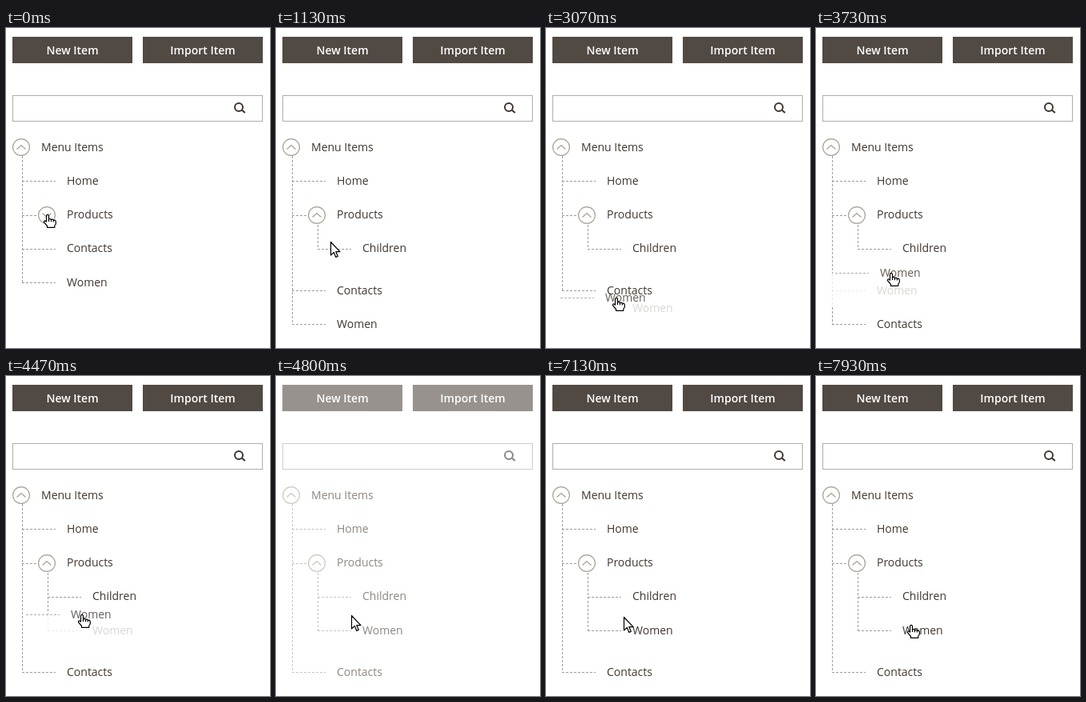
An HTML page with a canvas that plays this animation: 330x400 px, repeating every 8 s.

```html
<!DOCTYPE html>
<html lang="en">
<head>
<meta charset="utf-8">
<title>Menu tree</title>
<style>
  html, body { margin: 0; width: 100%; height: 100%; overflow: hidden; background: #fff; }
  canvas { display: block; }
</style>
</head>
<body>
<canvas id="stage" width="330" height="400"></canvas>
<script>
const ctx = document.getElementById('stage').getContext('2d');
const LOOP = 8000, EXPAND = 530, GRAB = 2470, DROP = 4530, READY = 6600;
const INK = '#41362f', BROWN = '#514943', RING = '#aaa093', DASH = '#9c9c9c';
const FONT = '"Open Sans", "Noto Sans", sans-serif';

// Pointer tip: time, x, y
const route = [
  [0, 52, 233], [800, 52, 233], [1350, 78, 290], [1930, 89, 374], [GRAB, 89, 374],
  [3070, 88, 337], [3330, 91, 322], [3730, 94, 306], [4470, 95, 298],
  [DROP, 94, 299], [7000, 94, 299], [7930, 119, 311]
];

const hand = new Path2D('M-1.5 1.5Q0-.7 1.5 1.5V6Q3.5 4.8 4.5 6.6Q6.3 5.6 7.3 7.3Q9.8 6.6 10.3 9' +
  'V12L8.8 14V16.3H-.5V14.5L-4.6 9.6Q-4.4 7-2.6 8.2L-1.5 9.2ZM1.5 6V9M4.5 6.6V9.3M7.3 7.3V9.5');
const arrow = new Path2D('M.5.5V17L4.3 13.4L6.8 19.4L9.3 18.4L6.8 12.6H12Z');

function pointerAt(t) {
  let i = 1;
  while (i < route.length - 1 && route[i][0] < t) i++;
  const [t0, x0, y0] = route[i - 1], [t1, x1, y1] = route[i];
  const k = Math.min(1, (t - t0) / (t1 - t0));
  return [Math.round(x0 + (x1 - x0) * k), Math.round(y0 + (y1 - y0) * k)];
}

function stroke(color, width, points) {
  ctx.strokeStyle = color;
  ctx.lineWidth = width;
  ctx.beginPath();
  for (const [x, y] of points) ctx.lineTo(x, y);
  ctx.stroke();
}

function dashed(x0, y0, x1, y1) {
  ctx.setLineDash([3, 2]);
  const d = y0 === y1 ? [0, .5] : [.5, 0];
  stroke(DASH, 1, [[x0 + d[0], y0 + d[1]], [x1 + d[0], y1 + d[1]]]);
  ctx.setLineDash([]);
}

function text(str, x, y, color = INK, weight = 400, align = 'left') {
  ctx.font = `${weight} 14px ${FONT}`;
  ctx.textAlign = align;
  ctx.fillStyle = color;
  ctx.fillText(str, x, y + 5);
}

function faded(alpha, draw) {
  ctx.save();
  ctx.globalAlpha = alpha;
  draw();
  ctx.restore();
}

// A label with the dashed hook on its left
function leaf(str, x, y, rule = y) {
  dashed(x - 56, rule, x - 14, rule);
  text(str, x, y);
}

function toggle(x, y, open) {
  const s = open ? 1 : -1;
  ctx.beginPath();
  ctx.arc(x, y, 10.4, 0, 7);
  ctx.fillStyle = '#fff';
  ctx.fill();
  ctx.strokeStyle = RING;
  ctx.lineWidth = 1.2;
  ctx.stroke();
  stroke(RING, 1.2, [[x - 5.5, y + 2.5 * s], [x, y - 2.5 * s], [x + 5.5, y + 2.5 * s]]);
}

function button(str, x) {
  ctx.fillStyle = BROWN;
  ctx.fillRect(x, 11, 150, 33);
  text(str, x + 75, 28, '#fff', 600, 'center');
}

function toolbar() {
  button('New Item', 8);
  button('Import Item', 171);
  ctx.strokeStyle = '#adadad';
  ctx.lineWidth = 1;
  ctx.strokeRect(8.5, 84.5, 312, 32);
  ctx.strokeStyle = INK;
  ctx.lineWidth = 2;
  ctx.beginPath();
  ctx.arc(291, 99, 5, 0, 7);
  ctx.stroke();
  stroke(INK, 2.2, [[294.8, 102.5], [298.8, 106]]);
}

function slotAt(t) {
  if (t < GRAB) return 'none';
  if (t < 2800) return 'last';
  if (t < 3370) return 'inContacts';
  if (t < 4000) return 'between';
  return t < DROP ? 'inProducts' : 'dropped';
}

function tree(t, slot) {
  const u = Math.max(0, Math.min(1, (t - EXPAND) / 200));
  const shift = Math.round(53 * (.5 - Math.cos(Math.PI * u) / 2));
  const moved = slot === 'between' || slot === 'inProducts' || slot === 'dropped';
  const contacts = moved ? 370 : 275 + shift;
  const women = shift === 53 ? 370 : 318 + shift;

  if (slot === 'between') {
    dashed(20, 160, 20, 307);
    faded(.2, () => dashed(20, 307, 20, 349));
    dashed(20, 349, 20, 370);
  } else {
    dashed(20, 160, 20, slot === 'none' ? women : contacts);
  }
  leaf('Home', 76, 191);
  dashed(20, 234, 40, 234);
  text('Products', 76, 233);

  if (shift) {
    ctx.save();
    ctx.beginPath();
    ctx.rect(0, 244, 330, moved ? 156 : shift);
    ctx.clip();
    dashed(52, 246, 52, slot === 'dropped' ? 318 : slot === 'inProducts' ? 297 : 276);
    leaf('Children', 108, 275, 276);
    ctx.restore();
  }
  toggle(51, 234, t >= EXPAND);
  leaf('Contacts', 76, contacts, contacts === 275 ? 276 : contacts);

  if (slot === 'none') leaf('Women', 76, women);
  if (slot === 'dropped') leaf('Women', 108, 318);
  faded(.2, () => {
    if (slot === 'last') {
      dashed(20, 328, 20, 370);
      leaf('Women', 76, 370);
    }
    if (slot === 'inContacts') text('Women', 108, 350);
    if (slot === 'between') leaf('Women', 76, 328);
    if (slot === 'inProducts') {
      dashed(52, 297, 52, 318);
      leaf('Women', 108, 318);
    }
  });

  toggle(19, 149, true);
  text('Menu Items', 44, 149);
}

function pointer(t, x, y) {
  const plain = (t > 1000 && t < 1800) || (t >= DROP && t < 7450);
  const shape = plain ? arrow : hand;
  ctx.save();
  ctx.translate(x, y);
  ctx.lineJoin = 'round';
  ctx.fillStyle = '#fff';
  ctx.fill(shape);
  ctx.strokeStyle = '#000';
  ctx.lineWidth = 1.2;
  ctx.stroke(shape);
  ctx.restore();
}

function draw(now) {
  const t = now % LOOP;
  const [x, y] = pointerAt(t);
  ctx.fillStyle = '#fff';
  ctx.fillRect(0, 0, 330, 400);
  toolbar();
  tree(t, slotAt(t));
  if (t >= GRAB && t < DROP) faded(.8, () => leaf('Women', x - 14, y));
  if (t >= DROP && t < READY) {
    ctx.fillStyle = 'rgba(255,255,255,.4)';
    ctx.fillRect(0, 0, 330, 400);
  }
  pointer(t, x, y);
}

let start;
function tick(now) {
  start ??= now;
  draw(now - start);
  requestAnimationFrame(tick);
}
requestAnimationFrame(tick);
</script>
</body>
</html>
```
